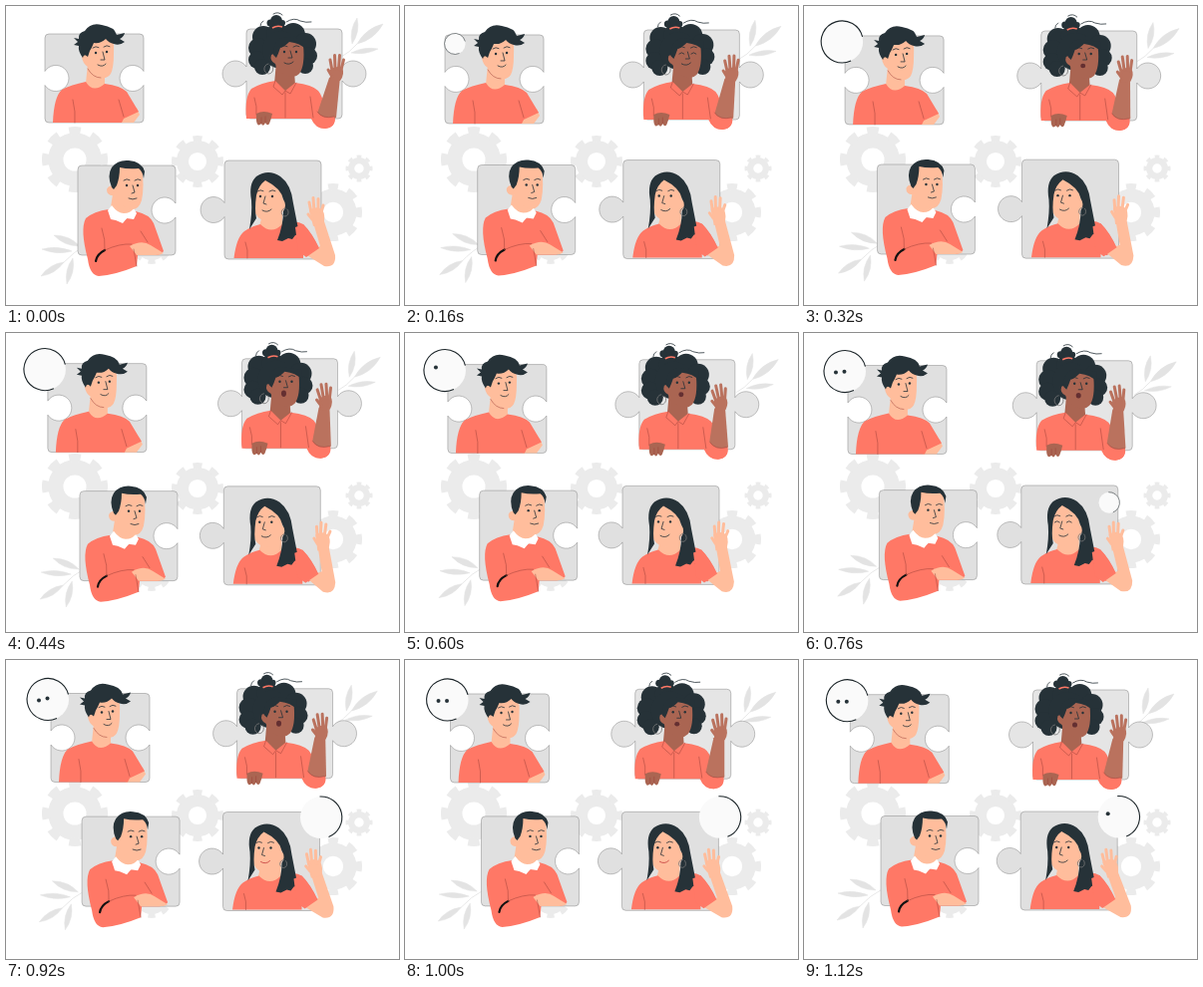
These frames come from a looping animation (394x300 px, 1.16 s). An HTML page:

```html
<!DOCTYPE html>
<html lang="en">
<head>
<meta charset="utf-8">
<title>Team puzzle</title>
<style>
html, body { margin: 0; width: 100%; height: 100%; overflow: hidden; background: #fff }
svg { display: block; width: 100vw; height: 100vh }
.coral { fill: #ff7866 }
.hair { fill: #263238 }
.light { fill: #ffbd9c }
.dark { fill: #aa6552 }
.arm { fill: #ba725e; stroke: #ba725e }
.line { fill: none; stroke: #263238; stroke-width: .8; stroke-linecap: round; stroke-linejoin: round }
.fold { fill: none; stroke: #9c4038; stroke-width: .5; stroke-linecap: round }
.leaf { fill: #e3e3e3; stroke: #e3e3e3; stroke-width: .5 }
.stem { fill: none; stroke: #e3e3e3; stroke-width: .8 }
.gear { fill: none; stroke: #ebebeb }
.piece { fill: #e0e0e0; stroke: #858585; stroke-width: .5 }
#womanA .piece { fill: #e5e5e5 }
.bubble { fill: #fafafa }
.rim { fill: none; stroke: #1c2529; stroke-width: 1.1 }
.finger { fill: none; stroke-linecap: round; stroke-width: 3 }
</style>
</head>
<body>
<svg id="stage" viewBox="0 0 394 300"></svg>
<script>
const LOOP = 1160, STEP = 40;
const stage = document.getElementById('stage');

const path = (cls, d, extra = '') => `<path class="${cls}" d="${d}" ${extra}/>`;
const dot = (x, y, r, cls = 'hair', extra = '') => `<circle class="${cls}" cx="${x}" cy="${y}" r="${r}" ${extra}/>`;
const group = (id, body) => `<g id="${id}">${body}</g>`;

// Eight teeth, one of them pointing along each axis.
function gear(x, y, r) {
  return dot(x, y, r * .58, 'gear', `stroke-width="${r * .46}"`) +
    dot(x, y, r * .88, 'gear', `stroke-width="${r * .24}" pathLength="16" stroke-dasharray="1" stroke-dashoffset=".5"`);
}

function leaf(x1, y1, x2, y2, bulge = .22) {
  const mx = (x1 + x2) / 2, my = (y1 + y2) / 2;
  const nx = (y2 - y1) * bulge, ny = (x1 - x2) * bulge;
  return path('leaf', `M${x1} ${y1}Q${mx + nx} ${my + ny} ${x2} ${y2}Q${mx - nx} ${my - ny} ${x1} ${y1}`);
}

// Side tabs: 1 is a knob, -1 a notch, 0 a straight edge.
function piece(x, y, w, h, left, right) {
  const c = y + h / 2, r = x + w, b = y + h;
  const tab = (side, ex, from, to) => side ? `V${from}A13 13 0 1 ${side > 0 ? 1 : 0} ${ex} ${to}` : '';
  return path('piece', `M${x + 4} ${y}H${r - 4}Q${r} ${y} ${r} ${y + 4}` + tab(right, r, c - 7, c + 7) +
    `V${b - 4}Q${r} ${b} ${r - 4} ${b}H${x + 4}Q${x} ${b} ${x} ${b - 4}` + tab(left, x, c + 7, c - 7) +
    `V${y + 4}Q${x} ${y} ${x + 4} ${y}Z`);
}

function eyes(id, x1, y1, x2, y2) {
  const brow = (x, y) => path('line', `M${x - 3} ${y - 5}q3 -2.4 6 -.4`);
  const lid = (x, y) => path('line', `M${x - 2.5} ${y + 1}q2.5 -2.6 5 0`);
  return brow(x1, y1) + brow(x2, y2) +
    group(id + 'Open', dot(x1, y1, 1.2) + dot(x2, y2, 1.2)) +
    `<g id="${id}Shut" display="none">${lid(x1, y1)}${lid(x2, y2)}</g>`;
}

const bubble = (id, x, y, rim) => group(id, dot(x, y, 21, 'bubble') + path('rim', rim));

const manA = piece(39, 28, 99, 89, -1, -1) +
  path('light', 'M116 106L131 102L134 109L128 117H114Z') +
  path('light', 'M82 58L80 77Q88 90 99 79V66Z') +
  path('coral', 'M47 117Q48 91 56 84Q65 79 80 76Q87 88 99 78Q115 80 121 86Q127 96 133 106L118 113L116 117Z') +
  path('light', 'M83 33L104 29Q109 33 108 48Q108 62 105 68Q102 73 95 72Q86 70 82 61Q77 58 76 51Q78 46 82 49Z') +
  path('hair', 'M68 32L73 33Q72 27 79 25Q85 16 96 19Q109 21 111 29L119 27Q118 31 114 33L119 36Q114 40 108 38Q103 37 100 33Q95 38 88 37Q86 42 84 45L82 51Q78 47 77 52Q72 45 73 40L68 39L72 36Z') +
  eyes('a', 90, 47, 101, 46) +
  path('line', 'M97 46L99 54L95 54M92 59q5 3 8 -1') +
  path('fold', 'M67 94Q70 106 69 117M113 94L118 111M82 63Q87 72 95 72') +
  bubble('talkA', 36, 34, 'M45 53A21 21 0 1 1 56.500 29') +
  `<g id="dotsA">${dot(27, 35, 2)}${dot(35.5, 35, 2)}</g>`;

const curls = [[258, 31, 11], [272, 28, 11], [288, 29, 12], [300, 38, 11], [303, 50, 9], [300, 60, 8],
  [253, 42, 10], [252, 54, 9], [257, 61, 8], [276, 44, 19]];
const womanA = piece(241, 23, 96, 90, 1, 1) +
  curls.map(c => dot(...c)).join('') + dot(271, 15, 6) + dot(265, 17, 3.5) + dot(277, 17, 3) +
  path('line', 'M281 16Q289 11 295 15Q301 17 306 16M268 8q5 -3 9 1M258 15q-3 2 -3 5') +
  path('', 'M267 22Q272 19 277 21', 'fill="none" stroke="#ff7866" stroke-width="1.500"') +
  path('dark', 'M271 56L269 78L279 90L290 79L289 66Z') +
  path('coral', 'M241 113Q239 91 246 83Q256 77 270 75L280 85L290 77Q307 79 313 85Q318 91 319 102L329 108Q333 121 320 123Q310 123 306 113Z') +
  `<g id="armA" class="arm">` +
  path('', 'M312 108L324 72Q329 67 335 71L331 112L322 116Z', 'stroke="none"') +
  path('', 'M325 64Q331 59 337 62Q340 68 335 75H325Z', 'stroke="none"') +
  path('finger', 'M327 65L325 54M330 63L329.500 49.500M333.500 63L334.500 49.500M336 64L338.500 54M327 71L323 64') + '</g>' +
  path('coral', 'M304 99L312 106Q317 114 329 111Q331 122 320 123Q310 123 306 112Z') +
  path('dark', 'M271 38Q284 32 298 39Q300 60 294 68Q288 74 280 69Q272 65 270 58Q264 55 266 49Q269 47 271 50Z') +
  path('hair', 'M268 49Q268 33 280 31L301 34V44Q295 37 284 36Q279 41 275 42Q273 48 271 52Z') +
  eyes('b', 279, 46, 291, 46) +
  path('line', 'M285 45L287 52L283 52') + path('line', 'M279 57q5 3 9 -1', 'id="smile"') +
  `<ellipse id="mouth" cx="283" cy="58" rx="2.5" ry="3" fill="#642f31"/>` +
  path('line', 'M263 58a4.500 5 0 1 0 4 2', 'style="stroke:#777"') +
  path('fold', 'M270 75L268 81L277 89L280 85L285 88L291 77M280 87V112M305 91L308 112M249 92Q252 101 251 109M312 106Q317 114 329 111') +
  path('dark', 'M251 108Q258 104 267 108Q266 113 264 118Q262 121 260 117Q258 122 256 118Q252 122 251 115Z') +
  path('fold', 'M256 112V118M260 111V117');

const manB = piece(72, 160, 98, 90, 0, -1) +
  path('light', 'M107 189L104 208L118 214L128 206V198Z') +
  path('coral', 'M82 254Q74 224 80 213Q88 206 103 204L118 216L130 206Q144 209 148 218L158 246Q155 250 149 250H132L131 261Q109 270 93 271Q84 270 82 254Z') +
  path('', 'M102 205L106 200Q112 208 118 208Q125 208 128 203L131 208L128 214L121 213L117 218L110 215L105 214Z', 'fill="#fff"') +
  path('light', 'M124 241Q136 234 145 240L158 248Q155 250 150 250H131Z') +
  path('light', 'M110 161H136Q139 181 136 195Q133 205 125 204Q114 202 109 190Q101 191 101 184Q103 179 108 181Z') +
  path('hair', 'M106 182Q101 170 106 162Q112 154 123 155Q136 156 139 166L138 173Q137 166 133 163Q122 164 114 162Q114 172 111 180L108 184Z') +
  eyes('c', 121, 180, 132, 180) +
  path('line', 'M127 180L129 187L126 188M123 193q4 2 8 0') +
  path('line', 'M90 256Q91 249 99 245', 'style="stroke-width:2.200;stroke:#111"') +
  path('fold', 'M99 245Q114 238 126 239M96 223Q100 235 99 245M131 261L128 244M135 226L142 237');

const womanB = piece(219, 155, 97, 99, 1, 0) +
  path('light', 'M258 205L254 221Q266 234 277 221V201Z') +
  path('coral', 'M228.500 253Q231 232 239 226Q246 221 255 219Q266 230 277 219Q291 214 298 219Q307 228 314 244L304 251L298 247V253Z') +
  path('light', 'M250 178Q262 170 275 180L278 195Q284 194 282 200L278 205Q274 216 264 216Q254 216 250 208Q248 195 250 178Z') +
  path('hair', 'M246 195Q243 178 251 171Q263 163 275 171Q286 179 288 198L294 229L290 230L287 234L283 233L277 236L272 235Q278 220 278 206Q282 200 278 194Q276 183 260 175Q253 180 251 190Q249 204 251 213L244 224Q247 208 246 195Z') +
  eyes('d', 255, 191, 267, 191) +
  path('line', 'M260 191L258 198L261 199') + path('line', 'M257 205q5 3 9 -1', 'id="lips"') +
  path('line', 'M280 203a3.500 4 0 1 0 2 1', 'style="stroke:#777"') +
  path('fold', 'M240 237Q243 245 242 253M292 233L299 247') +
  `<g id="armB" class="light" stroke="#ffbd9c">` +
  path('', 'M307 214L318 213L330 250Q331 263 319 261L300 249L315 241Z', 'stroke="none"') +
  path('', 'M304 205Q311 200 317 204Q321 211 318 219L308 221Z', 'stroke="none"') +
  path('finger', 'M306 207L304 197M309 206L308 192.500M313 206L313 193.500M316 207L318 200M307 214L303 209') + '</g>' +
  path('coral', 'M290 222L298 219Q307 228 314 243L301 252L293 246Z') +
  bubble('talkB', 317.5, 160.5, 'M316 139.500A21 21 0 0 1 325 180') +
  dot(306.5, 158, 2, 'hair', 'id="dotB"');

stage.innerHTML =
  group('leavesA', leaf(347, 38, 352, 12) + leaf(352, 38, 378, 18) + leaf(346, 47, 373, 43, .17) +
    path('stem', 'M336 51Q344 47 352 38')) +
  group('leavesB', leaf(58, 257, 35, 271) + leaf(67, 253, 61, 279) + leaf(66, 246, 36, 244, .17) +
    leaf(74, 241, 48, 230) + path('stem', 'M56 259Q68 246 82 239')) +
  gear(69, 154, 33) + gear(192, 156, 26) + gear(328, 207, 29) + gear(354, 163, 13.5) + gear(146, 238, 21) +
  group('manA', manA) + group('womanA', womanA) + group('manB', manB) + group('womanB', womanB);

const el = id => document.getElementById(id);
const clamp = v => Math.max(0, Math.min(1, v));
const show = (node, on) => node.setAttribute('display', on ? 'inline' : 'none');
const move = (id, x, y) => el(id).setAttribute('transform', `translate(${x} ${y})`);
const turn = (id, angle, x, y) => el(id).setAttribute('transform', `rotate(${angle} ${x} ${y})`);

const drift = {
  manA: [7.3, 6.7], womanA: [-11.5, 7], manB: [5, -3.5], womanB: [-1.8, -3],
  leavesA: [-7, 16], leavesB: [-2, -10]
};

// Linear interpolation through [time, value] points.
function track(t, keys) {
  const i = keys.findIndex(k => k[0] >= t);
  if (i < 1) return keys[i < 0 ? keys.length - 1 : 0][1];
  const [t0, v0] = keys[i - 1], [t1, v1] = keys[i];
  return v0 + (v1 - v0) * (t - t0) / (t1 - t0);
}

function blink(id, shut) {
  show(el(id + 'Open'), !shut);
  show(el(id + 'Shut'), shut);
}

function pop(id, t, start, x, y) {
  const s = clamp((t - start) / 140);
  show(el(id), s > 0);
  el(id).setAttribute('transform', `translate(${x} ${y}) scale(${s}) translate(${-x} ${-y})`);
}

function hop(node, t, start, height) {
  show(node, t >= start);
  node.setAttribute('transform', `translate(0 ${-height * Math.sin(Math.PI * clamp((t - start) / 240))})`);
}

function draw(now) {
  const t = Math.floor(now % LOOP / STEP) * STEP, p = t / (LOOP - STEP);
  for (const id in drift) move(id, drift[id][0] * p, drift[id][1] * p);
  turn('armA', track(t, [[0, 0], [160, -2.5], [320, -6], [600, -10], [760, -9], [1120, -4]]), 322, 116);
  turn('armB', track(t, [[0, 0], [160, 3], [320, 7], [540, 8], [760, 3], [920, -1], [1120, -3]]), 320, 258);
  blink('b', t >= 120 && t <= 200);
  blink('d', t >= 680 && t <= 840);
  show(el('smile'), t < 240);
  show(el('mouth'), t >= 240);
  el('mouth').setAttribute('ry', 2.7 + .5 * Math.sin(t / 60));
  el('lips').style.stroke = t >= 880 && t <= 1000 ? '#c33b3b' : '';
  pop('talkA', t, 90, 62, 40);
  pop('talkB', t, 690, 297, 184);
  const [first, second] = el('dotsA').children;
  hop(first, t, 480, 4);
  hop(second, t, 740, 3);
  hop(el('dotB'), t, 1040, 1);
}

function frame() {
  draw(performance.now());
  requestAnimationFrame(frame);
}
frame();
</script>
</body>
</html>
```
